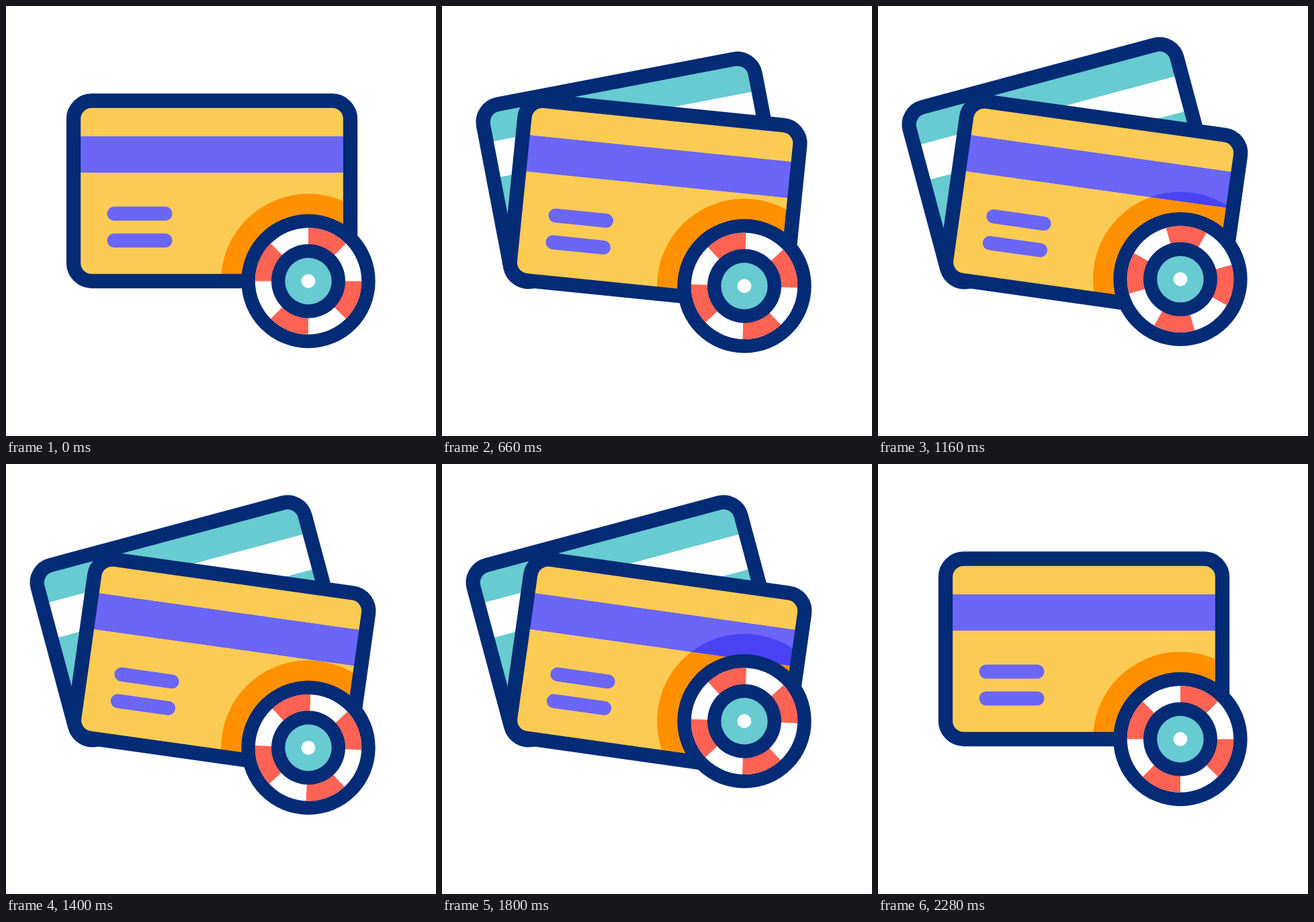
Animation of 640 by 640 pixels, one loop 2.4 s. Source, as an HTML page with a canvas:

```html
<!DOCTYPE html>
<html lang="en">
<head>
<meta charset="utf-8">
<title>Card and chip</title>
<style>
  html, body { margin: 0; width: 100%; height: 100%; overflow: hidden; background: #fff; }
  canvas { display: block; width: 640px; height: 640px; }
</style>
</head>
<body>
<canvas id="stage" width="640" height="640"></canvas>
<script>
const ctx = document.getElementById('stage').getContext('2d');
const LOOP = 2400, RAD = Math.PI / 180, CHIP_X = 450;
const NAVY = '#032b76', TEAL = '#67cbd1', PURPLE = '#6b66f8';

// [time in ms, value] keys, eased in and out between neighbours
const FAN = [[400, 0], [800, 1], [1800, 1], [2200, 0]];
const SPIN = [[200, 0], [2240, 360]];
const BOB = [[200, 409.5], [560, 427], [915, 375], [1345, 427], [1640, 377], [2240, 409.5]];

function valueAt(keys, t) {
  if (t <= keys[0][0]) return keys[0][1];
  for (let i = 1; i < keys.length; i++) {
    const [t0, a] = keys[i - 1], [t1, b] = keys[i];
    if (t < t1) {
      const u = (t - t0) / (t1 - t0);
      return a + (b - a) * u * u * (3 - 2 * u);
    }
  }
  return keys[keys.length - 1][1];
}

function disc(y, r, color) {
  ctx.fillStyle = color;
  ctx.beginPath();
  ctx.arc(CHIP_X, y, r, 0, 7);
  ctx.fill();
}

function box(x, y, w, h, r, color) {
  ctx.fillStyle = color;
  ctx.beginPath();
  ctx.roundRect(x, y, w, h, r);
  ctx.fill();
}

// Draws a disc in stage coordinates, cut to a rectangle of the turned card
function haloIn(x, y, w, h, chipY, color) {
  ctx.save();
  ctx.beginPath();
  ctx.rect(x, y, w, h);
  ctx.clip();
  ctx.resetTransform();
  disc(chipY, 130, color);
  ctx.restore();
}

function card(angle, px, py, face, stripe, details) {
  ctx.save();
  ctx.translate(px, py);
  ctx.rotate(angle * RAD);
  ctx.translate(-px, -py);
  box(100.5, 141, 412, 268.5, 27, face);
  box(105, 194, 403, 54, 0, stripe);
  if (details) details();
  ctx.strokeStyle = NAVY;
  ctx.lineWidth = 21.3;
  ctx.beginPath();
  ctx.roundRect(100.5, 141, 412, 268.5, 27);
  ctx.stroke();
  ctx.restore();
}

function chip(y, turn) {
  disc(y, 99.7, NAVY);
  disc(y, 79.2, '#fff');
  ctx.fillStyle = '#ff6354';
  for (let a = turn; a < turn + 360; a += 90) {
    ctx.beginPath();
    ctx.moveTo(CHIP_X, y);
    ctx.arc(CHIP_X, y, 79.2, a * RAD, (a + 45) * RAD);
    ctx.fill();
  }
  disc(y, 55, NAVY);
  disc(y, 34.7, TEAL);
  disc(y, 10.4, '#fff');
}

function draw(t) {
  const fan = valueAt(FAN, t), y = valueAt(BOB, t);
  ctx.fillStyle = '#fff';
  ctx.fillRect(0, 0, 640, 640);
  if (fan > 0) card(-15 * fan, 133, 378.6, TEAL, '#fff');
  card(8 * fan, 136.3, 388.8, '#fccb54', PURPLE, () => {
    haloIn(105, 145, 403, 260, y, '#ff9101');
    box(105, 194, 403, 54, 0, PURPLE);
    haloIn(105, 194, 403, 54, y, '#4a43f5');
    box(150.5, 298.5, 97, 21, 10.5, PURPLE);
    box(150.5, 338.5, 97, 21, 10.5, PURPLE);
  });
  chip(y, valueAt(SPIN, t));
}

const start = performance.now();
function tick() {
  draw((performance.now() - start) % LOOP);
  requestAnimationFrame(tick);
}
tick();
</script>
</body>
</html>
```
